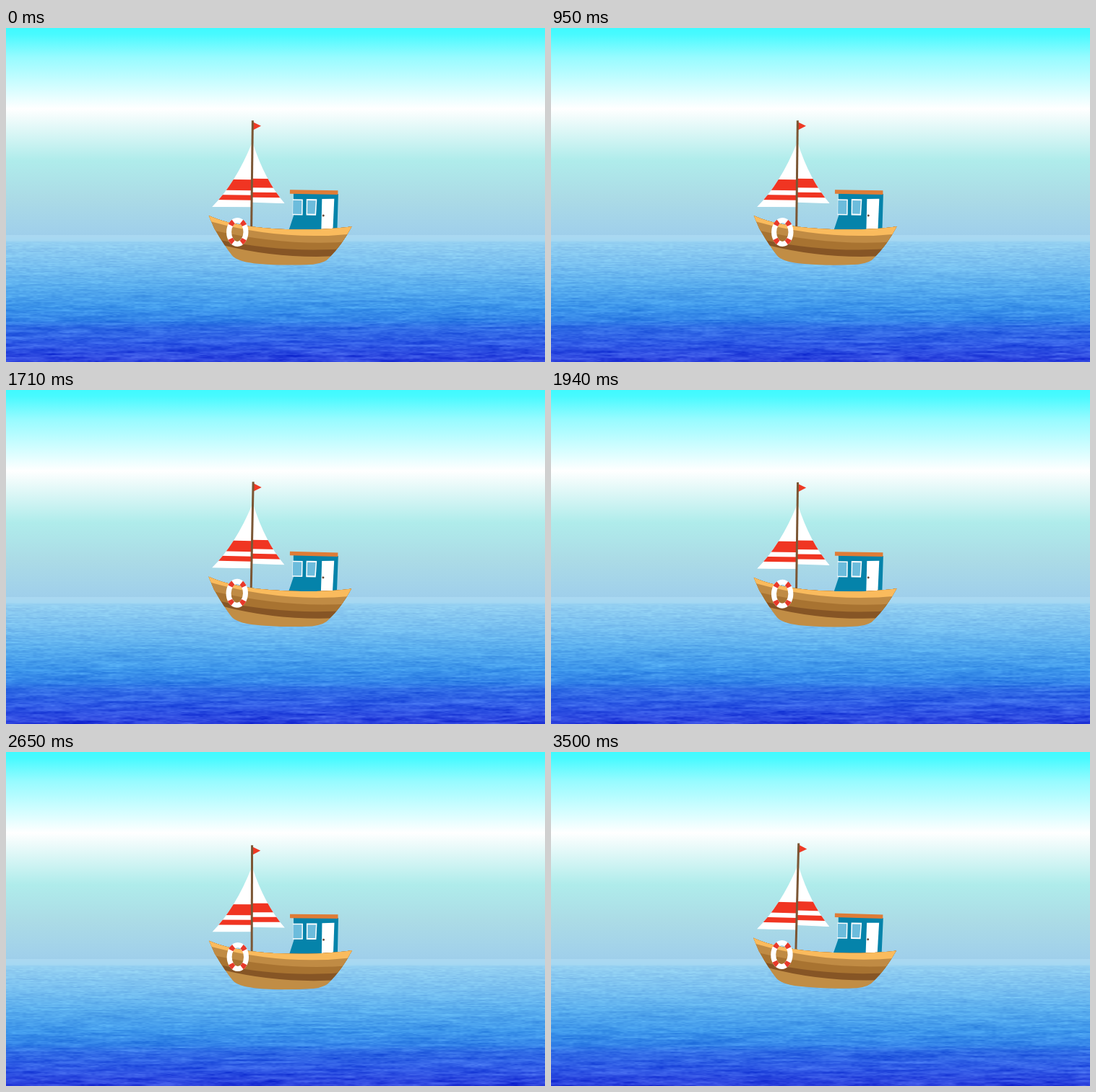
An HTML page with a canvas for the animation above (3610 ms loop, 746x463 px).

```html
<!DOCTYPE html>
<html lang="en">
<head>
<meta charset="utf-8">
<title>Boat at sea</title>
<style>
  html, body { margin: 0; width: 100%; height: 100%; overflow: hidden; }
  canvas, svg { position: absolute; left: 0; top: 0; display: block; }
</style>
</head>
<body>
<svg width="746" height="463" viewBox="0 0 746 463">
  <defs>
    <linearGradient id="sky" gradientUnits="userSpaceOnUse" x1="0" y1="0" x2="0" y2="287">
      <stop offset="0" stop-color="#40faff"/>
      <stop offset=".03" stop-color="#48faff"/>
      <stop offset=".14" stop-color="#96fbff"/>
      <stop offset=".39" stop-color="#fff"/>
      <stop offset=".64" stop-color="#afeceb"/>
      <stop offset=".82" stop-color="#abdbe6"/>
      <stop offset="1" stop-color="#9fcfeb"/>
    </linearGradient>
  </defs>
  <rect width="746" height="288" fill="url(#sky)"/>
</svg>
<canvas id="sea" width="746" height="176" style="top:287px"></canvas>
<svg width="746" height="463" viewBox="0 0 746 463">
  <defs>
    <clipPath id="left"><path d="M339.500 161Q318 216 285.500 250L339.500 249.500Z"/></clipPath>
    <clipPath id="right"><path d="M341 161Q358 212 386 244L341 243Z"/></clipPath>
    <clipPath id="hull">
      <path d="M281 262Q303 272 340 276.500T430 279.500Q460 278 479.200 275Q465 302 449 318Q443 326 426 328Q380 331 344 327.500Q321 325 314 317Q304 305 289 280Z"/>
    </clipPath>
  </defs>
  <g id="boat">
    <g clip-path="url(#left)">
      <rect x="280" y="160" width="60" height="92" fill="#fff"/>
      <path d="M280 211.500H340V226.500H280ZM280 233H340V240H280Z" fill="#f03522"/>
    </g>
    <g clip-path="url(#right)">
      <rect x="340" y="160" width="50" height="86" fill="#fff"/>
      <path d="M340 210H390V222.500H340ZM340 229H390V236H340Z" fill="#f03522"/>
    </g>
    <path d="M340.500 131.500L352 137L340.500 143Z" fill="#ee3a25"/>
    <path d="M340.300 129.500V280" stroke="#7b5634" stroke-width="3"/>

    <path d="M398 230H460L459 283H391.500L398.500 261Z" fill="#0583aa"/>
    <path d="M393 225L459.500 225.300V231L393 230.500Z" fill="#df7c36"/>
    <path d="M397 238H411V260H397Z" fill="#fff"/>
    <path d="M397.500 239.500H409.500V258.500H397.500Z" fill="#6cbcdc"/>
    <path d="M416 237.500H430.500L429.500 260H416Z" fill="#fff"/>
    <path d="M417.500 239.500H429L428 258H417.500Z" fill="#6cbcdc"/>
    <path d="M437.500 237.300L454.500 236.800L453 283H437Z" fill="#fff"/>
    <circle cx="439.700" cy="260.200" r="1.500" fill="#6b4a38"/>

    <g clip-path="url(#hull)">
      <rect x="275" y="255" width="210" height="80" fill="#c18d45"/>
      <path d="M275 250H485V314Q390 324 302 303Z" fill="#865525"/>
      <path d="M275 250H485V304Q395 315 292 295Z" fill="#a87331"/>
      <path d="M275 250H485V295Q395 305 285 282Z" fill="#c08b44"/>
      <path d="M275 250H485V284.500Q385 297 283 270Z" fill="#fabb5d"/>
    </g>
    <g fill="none" stroke-width="7">
      <ellipse cx="321" cy="284.500" rx="11.700" ry="16.500" stroke="#fff"/>
      <ellipse cx="321" cy="284.500" rx="11.700" ry="16.500" stroke="#e8392a"
        pathLength="100" stroke-dasharray="7 14 7 22" stroke-dashoffset="-11"/>
    </g>
  </g>
</svg>
<script>
const LOOP = 3610;
const SWING = 2000; // one rock forth and back
const LOWEST = 485; // time of the lowest bow
// [start, end, number of picture changes]
const bursts = [
  [70, 400, 5], [630, 790, 3], [950, 1250, 5], [1390, 1710, 6], [1910, 1940, 2],
  [2080, 2590, 8], [2650, 2650, 1], [2790, 3300, 8], [3430, 3500, 2]
];
// [y, r, g, b]
const tones = [
  [0, 170, 216, 241], [7, 165, 216, 242], [10, 147, 207, 241], [40, 121, 192, 240],
  [70, 90, 174, 238], [100, 62, 151, 235], [118, 52, 132, 232], [128, 48, 108, 229],
  [150, 47, 90, 229], [176, 42, 62, 220]
];
const boat = document.getElementById('boat');
const sea = document.getElementById('sea');
const ctx = sea.getContext('2d');
const W = sea.width, H = sea.height;
const image = ctx.createImageData(W, H);

let seed = 7;
const random = () => {
  seed = (Math.imul(seed, 1664525) + 1013904223) >>> 0;
  return seed / 4294967296;
};
const lattice = Float32Array.from({ length: 65536 }, () => random() * 2 - 1);
const smooth = f => f * f * (3 - 2 * f);
const lerp = (a, b, k) => a + (b - a) * k;

function noise(x, y) {
  const i = Math.floor(x), j = Math.floor(y);
  const u = smooth(x - i), v = smooth(y - j);
  const i0 = i & 255, i1 = (i + 1) & 255;
  const a = (j & 255) << 8, b = ((j + 1) & 255) << 8;
  return lerp(lerp(lattice[a + i0], lattice[a + i1], u),
              lerp(lattice[b + i0], lattice[b + i1], u), v);
}

function tone(y) {
  let n = 1;
  while (n < tones.length - 1 && tones[n][0] < y) n++;
  const a = tones[n - 1], b = tones[n];
  const k = (y - a[0]) / (b[0] - a[0]);
  return [1, 2, 3].map(c => lerp(a[c], b[c], k));
}

function drawSea(t) {
  const px = image.data, s = t / 1000;
  for (let y = 0, p = 0; y < H; y++) {
    const [r, g, b] = tone(y);
    const near = y / H;
    const amp = Math.min(1, Math.max(0, (y - 6) / 10)) * (0.35 + 0.45 * near);
    const row = 70 * Math.log(1 + y / 70);
    for (let x = 0; x < W; x++, p += 4) {
      const fine = noise(x / 5 + s * 3, y / 1.1 + s * 2);
      const wave = noise(x / 48 + s * 0.5, row / 0.9 + s)
                 + noise(x / 21 - s * 0.6, row / 0.7 + 90 - s * 0.7);
      const n = amp * (fine * (0.55 - 0.25 * near) + wave * (0.25 + 0.35 * near));
      px[p] = r + n * 36;
      px[p + 1] = g + n * 40;
      px[p + 2] = b + n * 19;
      px[p + 3] = 255;
    }
  }
  ctx.putImageData(image, 0, 0);
}

function heldTime(t) {
  let held = 0;
  for (const [from, to, count] of bursts) {
    if (t < from) break;
    const step = (to - from) / (count - 1) || 1;
    held = from + step * Math.min(count - 1, Math.floor((t - from) / step + 0.15));
  }
  return held;
}

// Steady swing: 0 at the lowest bow, 1 at the highest.
function swing(t) {
  const phase = (t - LOWEST + SWING) % SWING / SWING;
  return 1 - Math.abs(1 - 2 * phase);
}

function draw(t) {
  const angle = -0.1 + 1.6 * swing(t);
  boat.setAttribute('transform', `rotate(${angle.toFixed(3)} 455 222)`);
  drawSea(t);
}

let shown = -1;
const start = performance.now();
function tick() {
  const t = heldTime((performance.now() - start) % LOOP);
  if (t !== shown) draw(shown = t);
  requestAnimationFrame(tick);
}
tick();
</script>
</body>
</html>
```
